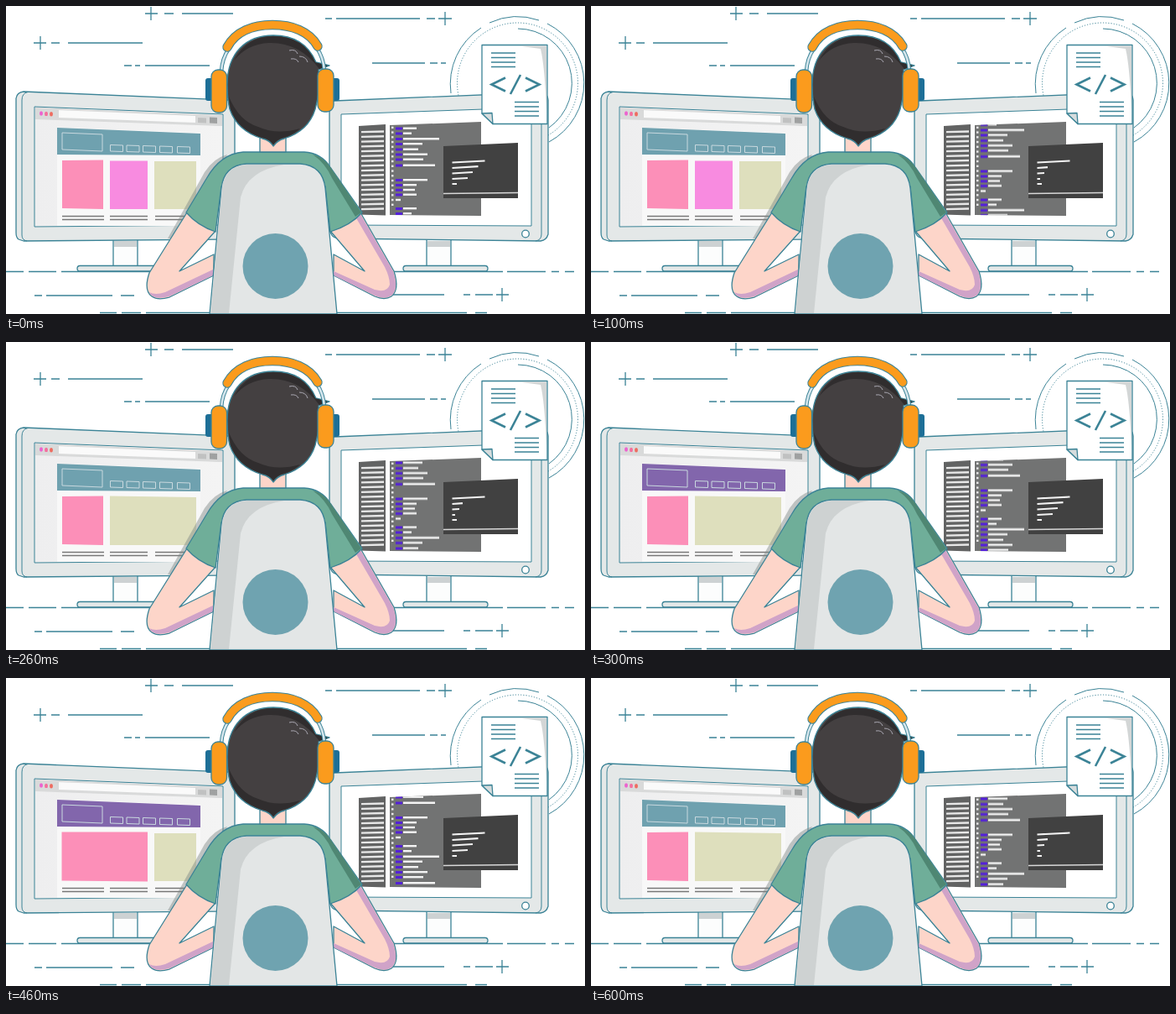
Write an HTML page that moves like this. It is 691 px wide and 367 px high and loops after 700 ms.

```html
<!DOCTYPE html>
<html lang="en">
<head>
<meta charset="utf-8">
<title>Developer at work</title>
<style>
html, body { margin: 0; width: 100%; height: 100%; overflow: hidden; background: #fff; }
svg { display: block; width: 691px; height: 367px; }
.line { fill: none; stroke: #3b8396; stroke-width: 1.3; }
.edge { stroke: #3b8396; stroke-width: 1.3; stroke-linejoin: round; }
.thin { stroke-width: 1; }
.pink { fill: #fc8fb8; }
.magenta { fill: #f88be0; }
.olive { fill: #dedfbd; }
.skin { fill: #fdd5c9; }
.shade { fill: #d0a3c8; }
.orange { fill: #fb9b1d; }
.metal { fill: #e4e8e8; }

.header, .lines, .thirds, .wideRight, .wideLeft, .full, .long, .short {
  animation: 700ms step-end infinite;
}
.header { animation-name: header; }
.lines { animation-name: scroll; }
.thirds { animation-name: thirds; }
.wideRight { animation-name: wideRight; }
.wideLeft { animation-name: wideLeft; }
.full { animation-name: full; }
.long { animation-name: long; }
.short { animation-name: short; }

@keyframes header {
  0%, 71.42%, 100% { fill: #6fa1af; }
  42.85% { fill: #8266ac; }
}
@keyframes scroll {
  0% { transform: translateY(0); }
  14.28% { transform: translateY(-10.5px); }
  28.57% { transform: translateY(-20.5px); }
  42.85% { transform: translateY(-30.5px); }
  57.14% { transform: translateY(-41px); }
  71.42% { transform: translateY(-71px); }
  85.71%, 100% { transform: translateY(-20.5px); }
}
@keyframes thirds { 0% { visibility: visible; } 28.57%, 100% { visibility: hidden; } }
@keyframes wideRight {
  0%, 57.14% { visibility: hidden; }
  28.57%, 85.71%, 100% { visibility: visible; }
}
@keyframes wideLeft {
  0%, 71.42%, 100% { visibility: hidden; }
  57.14% { visibility: visible; }
}
@keyframes full {
  0%, 85.71%, 100% { visibility: hidden; }
  71.42% { visibility: visible; }
}
@keyframes long {
  0%, 42.85% { visibility: visible; }
  14.28%, 85.71%, 100% { visibility: hidden; }
}
@keyframes short {
  0%, 42.85% { visibility: hidden; }
  14.28%, 85.71%, 100% { visibility: visible; }
}
</style>
</head>
<body>
<svg viewBox="0 0 691 367">
  <defs>
    <clipPath id="codeClip"><path d="M458 142L567 138V250L458 249Z"/></clipPath>
    <linearGradient id="glass"><stop stop-color="#eeeeef"/><stop offset="1" stop-color="#f4f4f4"/></linearGradient>
  </defs>

  <!-- backdrop strokes -->
  <path class="line" d="M166 9h15M173 1v16M189 9h11M210 9h61
    M33 44h15M41 36v16M54 44h10M74 44h89
    M141 71h9M154 71h6M166 71h77
    M381 15h8M394 15h100M502 15h10M516 15h16M524 7v16
    M437 68h63M506 68h9M519 68h6
    M0 316.500h21M27 316.500h33M66 316.500h125M437 316.500h156M598 316.500h46M651 316.500h9M667 316.500h11
    M34 345h9M48 345h79M137 345h16M462 344h61M546 344h8M560 344h21M585 344h15M592 336v16
    M112 365.500h20M138 365.500h23M167 365.500h383M560 365.500h14"/>

  <!-- rings -->
  <g class="line thin">
    <path d="M531 104A79.500 79.500 0 0 1 567 26M577 20A79.500 79.500 0 0 1 636 17M646 21A79.500 79.500 0 0 1 648 162"/>
    <circle cx="610.500" cy="92" r="72" stroke-dasharray="1.200 2"/>
    <path d="M611 27A65 65 0 0 1 648 145"/>
  </g>

  <!-- left monitor -->
  <path class="edge" fill="#fcfdfd" d="M128 278H157V311H128Z"/>
  <path d="M129 280H156V287H129Z" fill="#cdd2d3"/>
  <rect class="edge metal" x="85" y="309.500" width="97" height="6.500" rx="3.200"/>
  <path class="edge metal" d="M21 102L265 112Q273 113 273 121V264Q273 277 265 278L21 280L15 278Q12 276 12 270V110Q13 103 21 102Z"/>
  <path class="line thin" d="M26 102.500Q19 104 19 112V273Q19 279 25 280"/>
  <path d="M34 120L259 129V261L34 263Z" fill="url(#glass)" class="edge thin"/>
  <path d="M35 121L258 130V143L35 135Z" fill="#d9dada"/>
  <path d="M63 124L226 131V139L63 133Z" fill="#fafafa"/>
  <path d="M229 133L239 133.500V139.500L229 139Z" fill="#c0c1c1"/>
  <path d="M243 132.500L252 133V140L243 139.500Z" fill="#9fa1a1"/>
  <ellipse cx="42" cy="128" rx="2" ry="2.700" fill="#ec63cf"/>
  <ellipse cx="48" cy="128.400" rx="2" ry="2.700" fill="#f46f9d"/>
  <ellipse cx="54" cy="128.800" rx="2" ry="2.700" fill="#ee6c60"/>
  <path d="M61 145L232 151V262H61Z" fill="#f8f8f8"/>
  <path class="header" d="M61 145L232 152V178L61 177Z" fill="#6fa1af"/>
  <g fill="none" stroke="#c9d9df" stroke-width="1">
    <path d="M67 151L115 153V173L67 171Z"/>
    <path id="tab" d="M124.500 165.500L139.500 166V173.500L124.500 173Z"/>
    <use href="#tab" x="19.500" y=".5"/><use href="#tab" x="39" y="1"/>
    <use href="#tab" x="59" y="1.500"/><use href="#tab" x="80" y="2"/>
  </g>
  <g class="thirds">
    <path class="pink" d="M67 184L116 183.500V242L67 241Z"/>
    <path class="magenta" d="M124 184.500H169V242H124Z"/>
    <path class="olive" d="M177 185H227V242H177Z"/>
  </g>
  <g class="wideRight">
    <path class="pink" d="M67 184L116 183.500V242L67 241Z"/>
    <path class="olive" d="M124 183.500L227 185V242H124Z"/>
  </g>
  <g class="wideLeft">
    <path class="pink" d="M66.500 183.500H169V242.500L66.500 241.500Z"/>
    <path class="olive" d="M177 185H227V242H177Z"/>
  </g>
  <path class="full magenta" d="M66 183L226 184V242.500L66 241.500Z"/>
  <path d="M67 250.500H117M124 250.500H169M178 250.500H228M67 254.500H117M124 254.500H169M178 254.500H228" stroke="#777" stroke-width="1.500"/>

  <!-- right monitor -->
  <path class="edge" fill="#fcfdfd" d="M502 277H531V311H502Z"/>
  <path d="M503 280H530V287H503Z" fill="#cdd2d3"/>
  <rect class="edge metal" x="474" y="309.500" width="101" height="6.500" rx="3.200"/>
  <path class="edge metal" d="M639 103L392 113Q386 114 386 121V264Q387 276 396 277L638 280Q645 279 647 272V112Q646 103 639 103Z"/>
  <path class="line thin" d="M632 103.500Q639 105 639 113V272Q639 279 632 280"/>
  <path class="edge thin" d="M400 129L627 121V262L400 261Z" fill="#fff"/>
  <circle class="line" cx="620" cy="271.500" r="4.300" style="fill:#fff"/>
  <path d="M421 143L453 141V249.500L421 248.500Z" fill="#626363"/>
  <path d="M458 142L567 138V250L458 249Z" fill="#727373"/>
  <g id="gutter" stroke="#e8e8e8" stroke-width="2.400"></g>
  <g clip-path="url(#codeClip)"><g class="lines" id="code" stroke-width="2.400"></g></g>
  <path d="M522 167L611 163V229H522Z" fill="#414141"/>
  <path d="M522 223.500L611 222.500" stroke="#d8d8d8" stroke-width="1.600"/>
  <g stroke="#f3f3f3" stroke-width="2.200">
    <path d="M532.500 186.500L571.500 184.500M532.500 212H538"/>
    <path class="long" d="M532.500 193L563.500 191.200M532.500 199.500L557 198M532.500 206L551 205"/>
    <path class="short" d="M532.500 193L545 192.200M532.500 199.500L541 199M532.500 206H536"/>
  </g>

  <!-- document -->
  <path class="edge" fill="#fff" d="M568 46.500H646V140.500H581L568 128Z"/>
  <path d="M612 47.500H645V124Q643 72 638 51Z" fill="#d3d6d6"/>
  <path class="edge" fill="#d6dcdd" d="M568 128L580 127.500L581 140.500Z"/>
  <path class="line" d="M579 56H608M579 61.500H608M579 67H608M579 72.500H608M607 114.500H636M607 120H636M607 125.500H636M607 131H636"/>
  <path class="line" style="stroke-width:2.600" d="M596 85.500L579.500 93.500L596 101.500M620 85.500L636.500 93.500L620 101.500M614 82L602 105"/>

  <!-- body -->
  <path d="M264 177Q244 182 232 207L193 277L204 277L250 205Z" fill="#7c8583" opacity=".45"/>
  <path class="edge skin" d="M216 246L171 318Q164 339 174 346Q181 351 195 347L248 321V296L207 316L250 268Z"/>
  <path class="shade" d="M171 341Q178 345 190 341L247 314V321L195 346Q175 351 171 341Z"/>
  <path class="edge skin" d="M423 246L463 316Q470 338 460 346Q452 351 440 346L391 321V296L428 316L387 268Z"/>
  <path class="shade" d="M423 248L462 316Q469 337 460 345Q452 350 440 345L391 321V316L440 338Q455 342 458 332Q458 323 452 311L417 251Z"/>
  <path class="edge" fill="#6fae99" d="M283 174H356Q376 175 387 192L425 246Q412 261 387 269L381 215H257L250 269Q229 262 215 246L239 206Q256 176 283 174Z"/>
  <path d="M366 177Q379 180 387 192L424 246L417 251L389 205Q381 187 366 177Z" fill="#4f8773"/>
  <path class="edge skin" d="M303 150V174H334V150Z"/>

  <!-- chair -->
  <path class="edge" fill="#e3e6e6" d="M243 367L257 217Q260 190 287 188H351Q378 190 381 217L395 367Z"/>
  <path d="M244 366L258 217Q261 191 287 189H332Q288 196 280 228L266 366Z" fill="#ced2d2"/>
  <circle cx="321.500" cy="310" r="39" fill="#6fa3b0"/>

  <!-- head -->
  <path class="edge" fill="#444041" d="M264 94C264 56 286 35 319 35C345 35 361 46 370 67L386 71L373 76Q376 98 369 123Q361 149 332 158Q324 160 319 167Q315 160 306 158Q276 149 267 123Q264 111 264 94Z"/>
  <g fill="#302d2e">
    <path d="M272 65Q287 36 319 36Q356 36 369 67L384 71L374 75Q350 43 314 44Q288 45 272 65Z"/>
    <path d="M266 108Q278 137 301 144Q323 154 351 146Q342 154 331 157Q323 159 319 165Q315 159 306 157Q277 148 268 123Z"/>
  </g>
  <path d="M338 53Q346 51 348 57M340 63Q347 62 349 67M350 60Q358 60 360 67" fill="none" stroke="#aaa8b2"/>

  <!-- headphones -->
  <g fill="none">
    <path d="M266 51Q258 62 257 78M371 50Q379 62 380 77" stroke="#3b8396" stroke-width="4.600"/>
    <path d="M266 51Q258 62 257 78M371 50Q379 62 380 77" stroke="#d5e6ed" stroke-width="2.600"/>
    <g stroke-linecap="round">
      <path id="band" d="M264 49C274 30 295 22.500 318 22.500S362 30 372 48" stroke="#3b8396" stroke-width="11.500"/>
      <path d="M264 49C274 30 295 22.500 318 22.500S362 30 372 48" stroke="#fb9b1d" stroke-width="9.300"/>
    </g>
  </g>
  <rect x="238" y="86" width="12" height="27" rx="3" fill="#1d6f97"/>
  <rect x="386" y="86" width="12" height="27" rx="3" fill="#1d6f97"/>
  <rect class="edge orange" x="245" y="76" width="18.500" height="51" rx="8"/>
  <rect class="edge orange" x="372" y="75" width="19" height="51" rx="8"/>
</svg>
<script>
const get = id => document.getElementById(id);
const stroke = (x1, x2, y, attrs = "") => `<path d="M${x1} ${y}H${x2}" ${attrs}/>`;
const white = 'stroke="#f4f4f4"';
const purple = 'stroke="#5420d8" stroke-width="3"';

// each row: offset inside the repeating block, right end
const rows = [[0, 512], [17.5, 503], [23.5, 490], [29.3, 488], [35, 490], [41, 471],
  [51.5, 490], [57.5, 484], [64, 517], [70, 497], [76.5, 492], [82.5, 503], [88.5, 498]];
const period = 95.5;

let code = "";
for (const start of [190 - period, 190, 190 + period]) {
  for (const [dy, end] of rows) {
    const y = start + dy;
    if (end > 471) code += stroke(465, 473, y, purple) + stroke(474, end, y - 0.3, white);
    else code += stroke(465, end, y, white);
  }
}
get("code").innerHTML = code;

let gutter = "";
for (let i = 0; i < 17; i++) {
  const y = 149.8 + i * 5.75;
  gutter += `<path d="M424 ${y + 0.3}L451 ${y - 0.3}"/>` + stroke(460, 462.5, y - 5);
}
get("gutter").innerHTML = gutter;
</script>
</body>
</html>
```
